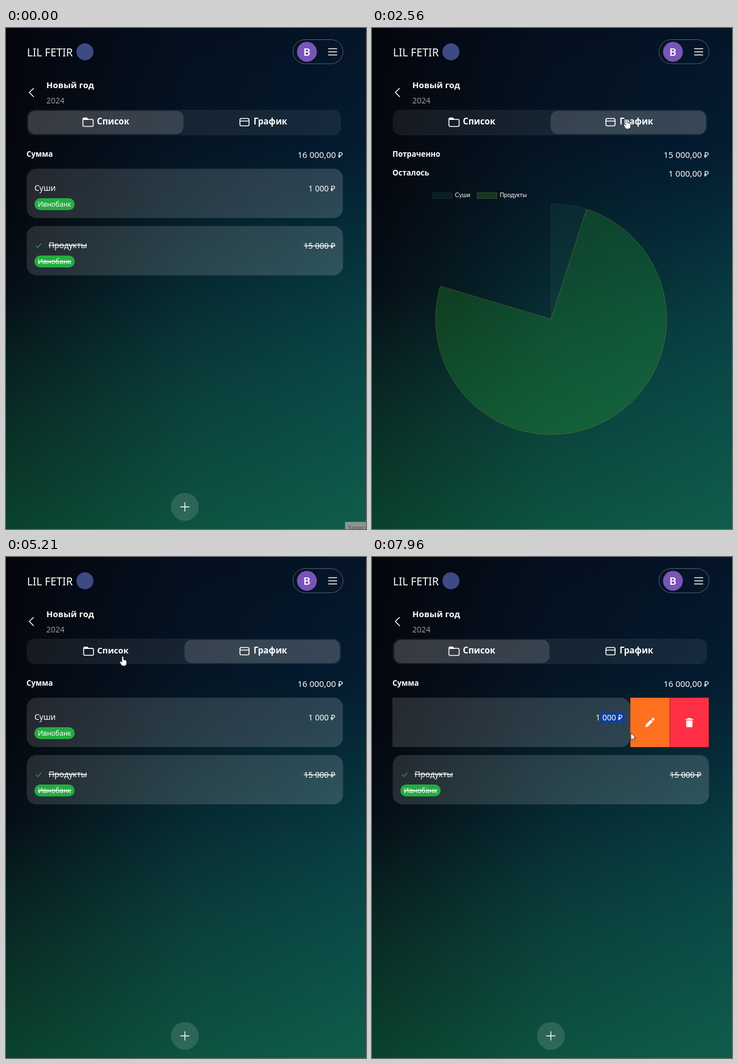
Recreate the animation shown at these times as an HTML page. Size 634x883 px, loop 8000 ms.

```html
<!DOCTYPE html>
<html lang="ru">
<head>
<meta charset="utf-8">
<title>Бюджет</title>
<style>
  html, body { margin: 0; width: 100%; height: 100%; overflow: hidden; }
  body { background: linear-gradient(#05060d 0, #06080f 34%, #060e16 52%, #081c1e 63%, #0a2c25 77%, #0a422d 100%); }
  .right {
    position: fixed; inset: 0;
    background: linear-gradient(#051529 0, #041c31 23%, #052d3a 40%, #083f43 57%, #0b4c48 74%, #105d4c 100%);
    -webkit-mask-image: linear-gradient(to right, transparent, rgba(0, 0, 0, .64) 50%, #000);
    mask-image: linear-gradient(to right, transparent, rgba(0, 0, 0, .64) 50%, #000);
  }
  #stage { position: fixed; left: 0; top: 0; width: 100vw; height: 100vh; }
  text { font: 14px "Noto Sans", sans-serif; fill: #fff; }
  .line { fill: none; stroke: #fff; stroke-width: 1.6; stroke-linecap: round; stroke-linejoin: round; }
  .brand { font-size: 19px; font-weight: 300; }
  .title { font-size: 15px; font-weight: 600; }
  .muted { fill: #939c9f; }
  .tab { font-size: 15.2px; font-weight: 600; }
  .label { font-size: 13.3px; font-weight: 600; }
  .sum { font-size: 14.9px; }
  .end { text-anchor: end; }
  .mid { text-anchor: middle; }
  .bank { font-size: 12px; text-anchor: middle; }
  .struck text { text-decoration: line-through; }
  .legend { font: 10.5px "Liberation Sans", sans-serif; }
  .small { fill: rgba(75, 150, 110, .1); stroke: rgba(75, 192, 160, .13); }
  .large { fill: rgba(45, 190, 42, .22); stroke: rgba(255, 159, 64, .24); }
</style>
</head>
<body>
<div class="right"></div>
<svg id="stage" viewBox="0 0 634 883">
  <defs>
    <linearGradient id="glass">
      <stop offset="0" stop-color="#fff" stop-opacity=".125"/>
      <stop offset="1" stop-color="#fff" stop-opacity=".16"/>
    </linearGradient>
    <clipPath id="row"><path d="M36 248h557.5v87H36z"/></clipPath>
  </defs>

  <!-- header -->
  <text class="brand" x="37" y="50">LIL FETIR</text>
  <circle cx="139" cy="42" r="15" fill="#3d4a86"/>
  <rect x="505.5" y="20.5" width="88" height="42.5" rx="21.2" fill="none" stroke="#59636e"/>
  <circle cx="530" cy="42" r="17.5" fill="#7a55b8"/>
  <text class="mid" x="530" y="48.7" style="font:500 19px Roboto,sans-serif">B</text>
  <path class="line" d="M568 36.5h14.5M568 42h14.5M568 47.5h14.5"/>
  <path class="line" d="M48.5 106.5L41 113.5l7.5 7.5"/>
  <text class="title" x="71" y="106">Новый год</text>
  <text class="muted" x="71" y="133">2024</text>

  <!-- tabs -->
  <rect x="36.5" y="144" width="553.5" height="45" rx="14" fill="#fff" fill-opacity=".07"/>
  <rect id="thumb" x="39" y="146" width="273.5" height="41" rx="12.5" fill="#fff" fill-opacity=".14"/>
  <g id="listTab">
    <path class="line" d="M135.5 161q0-2.500 2.500-2.500h4l2.500 2.500h6.500q2.500 0 2.500 2.500v7.500q0 2.500-2.500 2.500h-13q-2.500 0-2.500-2.500z"/>
    <path fill="#fff" d="M135.500 162v-1q0-2.500 2.500-2.500h4l3.500 3.500z"/>
    <text class="tab" x="160" y="170">Список</text>
  </g>
  <g id="chartTab">
    <rect class="line" x="412" y="159.500" width="16" height="13" rx="2.500"/>
    <path class="line" d="M412 164h16"/>
    <text class="tab" x="436" y="170">График</text>
  </g>

  <g id="listView">
    <text class="label" x="36" y="227">Сумма</text>
    <text class="sum end" x="593.500" y="229">16 000,00 ₽</text>
    <g clip-path="url(#row)">
      <g id="card">
        <rect x="36.500" y="248" width="557" height="87" rx="17" fill="url(#glass)"/>
        <text x="50" y="287">Суши</text>
        <rect id="selection" x="540.500" y="274" width="43" height="18" fill="#0a3f9f"/>
        <text class="end" x="580" y="288">1 000 ₽</text>
        <rect x="50" y="300" width="71" height="21" rx="10.500" fill="#22ad40"/>
        <text class="bank" x="85.500" y="315">Ивнобанк</text>
      </g>
      <svg id="edit" y="248" height="87">
        <rect width="100%" height="100%" fill="#fd7020"/>
        <path fill="#fff" d="M-8 51.500v-3.500l9.500-9.500 3.500 3.500-9.500 9.500zM2.500 37.500l1.700-1.700q1-1 2 0l1.500 1.500q1 1 0 2l-1.700 1.700z"/>
      </svg>
      <svg id="remove" y="248" height="87">
        <rect width="100%" height="100%" fill="#ff3043"/>
        <path fill="#fff" d="M-6.500 37h3.500l1-1.200h4l1 1.200h3.500v2h-13zM-5.500 40h11v10q0 2-2 2h-7q-2 0-2-2z"/>
      </svg>
    </g>
    <g class="struck">
      <rect x="36.500" y="349" width="557" height="87" rx="17" fill="url(#glass)"/>
      <path class="line" style="stroke:#2f9a6a;stroke-width:1.200" d="M53 384l2.800 3 6-6.500"/>
      <text x="75" y="388">Продукты</text>
      <text class="end" x="580" y="389">15 000 ₽</text>
      <rect x="50" y="401" width="71" height="21" rx="10.500" fill="#22ad40"/>
      <text class="bank" x="85.500" y="416">Ивнобанк</text>
    </g>
    <circle cx="315" cy="844" r="24.500" fill="#fff" fill-opacity=".13"/>
    <path class="line" style="stroke-width:1.400" d="M307.500 844h15M315 836.500v15"/>
  </g>

  <g id="chartView">
    <text class="label" x="36" y="227">Потраченно</text>
    <text class="sum end" x="593.500" y="229">15 000,00 ₽</text>
    <text class="label" x="36" y="260">Осталось</text>
    <text class="sum end" x="593.500" y="262">1 000,00 ₽</text>
    <rect class="small" x="106" y="290" width="35" height="10.500"/>
    <text class="legend" x="146" y="298">Суши</text>
    <rect class="large" x="185" y="290" width="35" height="10.500"/>
    <text class="legend" x="225" y="298">Продукты</text>
    <path id="sushi" class="small"/>
    <path id="food" class="large"/>
  </g>

  <g id="tooltip">
    <path fill="#8a9592" d="M597 870.500h37V883h-37z"/>
    <text x="602" y="885" style="font-size:10.500px;fill:#4c5654">Запись</text>
  </g>

  <g id="cursor" stroke="#111" stroke-width=".8" fill="#fff">
    <path id="arrow" d="M0 0v12.500l2.800-2.600 2 4.500 2-.9-2-4.300h3.700z"/>
    <path id="hand" d="M-2 1.500q0-1.500 1.500-1.500t1.500 1.500V6l3.500.8q2 .5 2 2.200v3q0 5-5 5H0q-2 0-3.500-2.500L-6 10q0-1.800 1.800-1.200L-2 10.500z"/>
    <path id="beam" fill="none" stroke="#9aa7ad" stroke-width="1" d="M-2.500-5.500h2l.5.500.5-.5h2M0-5V5M-2.500 5.500h2L0 5l.5.500h2"/>
  </g>
</svg>
<script>
const LOOP = 8000;
const ACTIONS = 138.5; // resting width of the swipe actions
const $ = id => document.getElementById(id);
const clamp = x => Math.min(1, Math.max(0, x));
const span = (t, from, to) => clamp((t - from) / (to - from));
const smooth = x => x * x * (3 - 2 * x);
const within = (t, from, to) => t >= from && t < to;
const show = (id, on) => $(id).setAttribute('display', on ? 'inline' : 'none');

// pointer waypoints: time, x, y
const route = [
  [580, 606, 876], [780, 603, 868], [1550, 446, 126], [1620, 446, 130], [1690, 449, 161],
  [3830, 449, 161], [3900, 451, 164], [4010, 457, 172], [4300, 340, 209], [4660, 213, 204],
  [4730, 212, 192], [5010, 206, 175], [5980, 206, 175], [6310, 340, 291], [6450, 340, 291],
  [6720, 537, 291], [6900, 537, 291], [7680, 347, 300], [7750, 347, 308], [7960, 456, 310]
];

function pointerAt(t) {
  const i = route.findIndex(p => p[0] > t);
  if (i < 0) return route[route.length - 1].slice(1);
  const [t0, x0, y0] = route[Math.max(0, i - 1)], [t1, x1, y1] = route[i];
  const k = t0 === t1 ? 0 : span(t, t0, t1);
  return [x0 + (x1 - x0) * k, y0 + (y1 - y0) * k];
}

function slice(from, to) {
  const cx = 315.5, cy = 513, r = 203.5;
  const point = a => `${cx + r * Math.sin(a)} ${cy - r * Math.cos(a)}`;
  return `M${cx} ${cy}L${point(from)}A${r} ${r} 0 ${+(to - from > Math.PI)} 1 ${point(to)}Z`;
}

function drawTabs(t) {
  const selected = smooth(span(t, 2160, 2440)) - smooth(span(t, 5220, 5470));
  $('thumb').setAttribute('x', 39 + 275.5 * selected);
  const press = (id, cx, on) =>
    $(id).setAttribute('transform', on ? `translate(${cx} 165) scale(.97) translate(${-cx} -165)` : '');
  press('listTab', 175, within(t, 5150, 5290));
  press('chartTab', 452, within(t, 2150, 2290));
}

function drawChart(t) {
  const turn = 2 * Math.PI * (1 - (1 - span(t, 2233, 3233)) ** 4);
  $('sushi').setAttribute('d', slice(0, turn / 16));
  $('food').setAttribute('d', slice(turn / 16, turn * .99999));
}

function drawSwipe(t) {
  const pull = 190 * span(t, 6900, 7680);
  const width = pull - (190 - ACTIONS) * smooth(span(t, 7720, 7950));
  $('card').setAttribute('transform', `translate(${-width} 0)`);
  show('selection', t >= 6960);
  ['edit', 'remove'].forEach((id, i) => {
    const button = $(id), half = width / 2;
    button.setAttribute('x', 593.5 - width + i * half);
    button.setAttribute('width', half);
    button.lastElementChild.setAttribute('transform', `translate(${half / 2} 0)`);
  });
}

function drawPointer(t) {
  const [x, y] = pointerAt(t);
  const beam = within(t, 6650, 7700);
  const hand = !beam && y > 144 && y < 189 && x < 590 && t > 1600;
  $('cursor').setAttribute('transform', `translate(${x} ${y})`);
  show('cursor', t >= 580);
  show('beam', beam);
  show('hand', hand);
  show('arrow', !beam && !hand);
}

function draw(now) {
  const t = now % LOOP, chart = within(t, 2200, 5180);
  show('tooltip', t < 70);
  show('listView', !chart);
  show('chartView', chart);
  drawTabs(t);
  drawChart(t);
  drawSwipe(t);
  drawPointer(t);
}

const start = performance.now();
(function tick() {
  draw(performance.now() - start);
  requestAnimationFrame(tick);
})();
</script>
</body>
</html>
```
